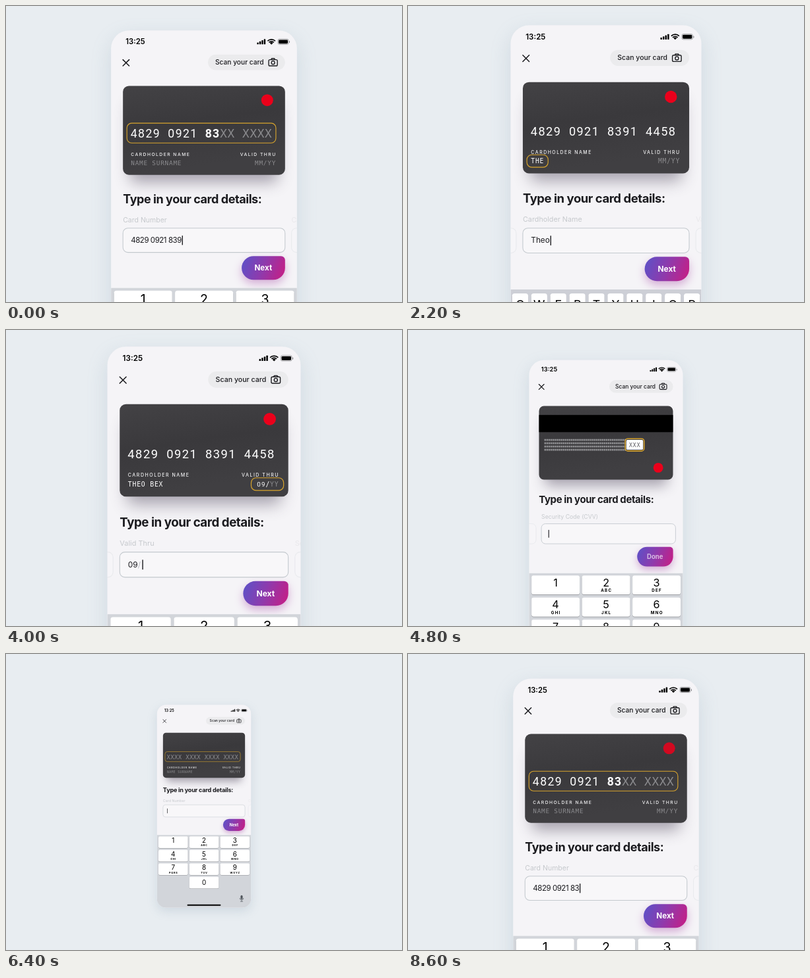
Write an HTML page with a canvas that moves like this. It is 600x450 px and loops after 8.7 s.

```html
<!DOCTYPE html>
<html lang="en">
<head>
<meta charset="utf-8">
<title>Card details form</title>
<style>
  html, body { margin: 0; width: 100%; height: 100%; overflow: hidden; background: #e8edf1; }
  canvas { display: block; width: 600px; height: 450px; }
</style>
</head>
<body>
<canvas id="stage"></canvas>
<script>
const LOOP = 8700, LEAD = 2300;        // the page opens LEAD ms into the cycle that begins with an empty form
const W = 375, H = 812;                // phone size in its own units
const SANS = 'Inter, sans-serif', MONO = '"DejaVu Sans Mono", monospace', DIGIT = 'Roboto, sans-serif';
const GOLD = '#d9a52c', INK = '#1b1b1f', RED = '#eb001b', FAINT = '#8b8b8e';

const fields = [
  { label: 'Card Number', chars: '4829092183914458', start: 250, gap: 200 },
  { label: 'Cardholder Name', chars: 'Theo Bex', start: 3980, gap: 150 },
  { label: 'Valid Thru', chars: '0921', start: 5800, gap: 260 },
  { label: 'Security Code (CVV)', chars: '927', start: 7450, gap: 250 }
];

const canvas = document.getElementById('stage'), ctx = canvas.getContext('2d');
const dpr = Math.max(1, window.devicePixelRatio || 1);
canvas.width = 600 * dpr;
canvas.height = 450 * dpr;
let zoom = 1;

const clamp = v => Math.min(1, Math.max(0, v));
const mix = (a, b, p) => a + (b - a) * p;
const cubic = p => p < .5 ? 4 * p ** 3 : 1 - 4 * (1 - p) ** 3;
const sine = p => (1 - Math.cos(Math.PI * p)) / 2;
const ramp = (u, start, length, ease = cubic) => ease(clamp((u - start) / length));

function typed(field, u, lag = 0) {
  if (u > 8420) return 0;
  const n = Math.floor((u - lag - field.start) / field.gap) + 1;
  return Math.min(field.chars.length, Math.max(0, n));
}

function box(x, y, w, h, r, fill, stroke, line = 1.4) {
  ctx.beginPath();
  ctx.roundRect(x, y, w, h, r);
  if (fill) { ctx.fillStyle = fill; ctx.fill(); }
  if (stroke) { ctx.strokeStyle = stroke; ctx.lineWidth = line; ctx.stroke(); }
}

function circle(x, y, r, fill) {
  ctx.beginPath();
  ctx.arc(x, y, r, 0, 2 * Math.PI);
  if (fill) { ctx.fillStyle = fill; ctx.fill(); } else ctx.stroke();
}

function line(...points) {
  ctx.beginPath();
  for (let i = 0; i < points.length; i += 2) ctx.lineTo(points[i], points[i + 1]);
  ctx.stroke();
}

function text(str, x, y, font, color, align = 'left', spacing = 0) {
  ctx.font = font;
  ctx.fillStyle = color;
  ctx.textAlign = align;
  ctx.letterSpacing = spacing + 'px';
  ctx.fillText(str, x, y);
  return ctx.measureText(str).width;
}

function withShadow(color, blur, dy, draw) {
  ctx.save();
  ctx.shadowColor = color;
  ctx.shadowBlur = blur * zoom * dpr;
  ctx.shadowOffsetY = dy * zoom * dpr;
  draw();
  ctx.restore();
}

function gradient(x0, y0, x1, y1, ...colors) {
  const g = ctx.createLinearGradient(x0, y0, x1, y1);
  colors.forEach((c, i) => g.addColorStop(i / (colors.length - 1), c));
  return g;
}

// Embossed card lettering: each character sits in a cell of equal width.
function embossed(str, x, y, size, cell, style) {
  [...str].forEach((ch, i) => {
    const [color, weight = 400] = style(i);
    text(ch, x + cell * (i + .5), y, `${weight} ${size}px ${/\d/.test(ch) ? DIGIT : MONO}`, color, 'center');
  });
}

function header() {
  text('13:25', 29.5, 28, `600 15px ${SANS}`, '#000');
  for (let i = 0; i < 4; i++) box(294.5 + i * 4.6, 24.2 - i * 2.3, 3.2, 3.8 + i * 2.3, .8, '#000');

  ctx.strokeStyle = '#000';
  ctx.lineWidth = 2.2;
  for (const r of [11, 7]) {
    ctx.beginPath();
    ctx.arc(323.5, 29, r, -Math.PI * .75, -Math.PI * .25);
    ctx.stroke();
  }
  ctx.beginPath();
  ctx.moveTo(323.5, 28.5);
  ctx.arc(323.5, 28.5, 4.6, -Math.PI * .75, -Math.PI * .25);
  ctx.fillStyle = '#000';
  ctx.fill();
  box(336.5, 17.3, 21.5, 10.7, 3, null, '#8a8a8d', 1);
  box(338, 18.8, 18.5, 7.7, 1.8, '#000');
  box(359.2, 21, 1.4, 4, .7, '#8a8a8d');

  ctx.strokeStyle = INK;
  ctx.lineWidth = 2;
  ctx.lineCap = 'round';
  line(24, 59, 36.5, 71.5);
  line(36.5, 59, 24, 71.5);
  ctx.lineCap = 'butt';

  box(195.5, 48.5, 155.5, 31.5, 16, '#ebebed');
  text('Scan your card', 210, 69, `500 13.6px ${SANS}`, INK);
  ctx.strokeStyle = INK;
  ctx.lineWidth = 1.8;
  ctx.lineJoin = 'round';
  ctx.beginPath();
  ctx.roundRect(318, 59, 17.5, 12.5, 2.5);
  ctx.stroke();
  line(322.5, 59, 324, 56.5, 329.5, 56.5, 331, 59);
  circle(326.8, 65, 3.3);
}

function highlight(u, step) {
  const nameLength = typed(fields[1], u, 100) || 12;
  const spots = [
    [32, 187.5, 300.5, 40], [32, 255.5, 16 + 8.55 * nameLength, 24.5],
    [279, 255.5, 63, 24.5], [279, 255.5, 63, 24.5]
  ];
  const i = Math.min(2, Math.floor(step));
  const [x, y, w, h] = spots[i].map((v, k) => mix(v, spots[i + 1][k], step - i));
  box(x, y, w, h, 9.5, null, GOLD, 1.5);
}

function cardFront(u, step) {
  const [number, name, date] = fields;
  const shown = typed(number, u, 100), nameShown = typed(name, u, 100), dateShown = typed(date, u, 100);

  // The issuer badge fades in once enough digits are known.
  ctx.globalAlpha = u > 8420 ? 0 : ramp(u, 1900, 450);
  circle(315, 141, 12, RED);
  ctx.globalAlpha = 1;

  const digits = number.chars.slice(0, shown).padEnd(16, 'X').replace(/(.{4})(?=.)/g, '$1 ');
  embossed(digits, 38.5, 217, 23.5, 15.06, cellIndex => {
    const i = cellIndex - Math.floor(cellIndex / 5);
    if (i >= shown) return [FAINT];
    const fresh = shown < 16 && u - number.start - i * number.gap < 460;
    return ['#fff', fresh ? 700 : 400];
  });

  const caption = `500 9px ${SANS}`;
  text('CARDHOLDER NAME', 40, 253.5, caption, '#f2f2f3', 'left', 1.95);
  text('VALID THRU', 333.5, 253.5, caption, '#f2f2f3', 'right', 1.95);
  const nameText = nameShown ? name.chars.slice(0, nameShown).toUpperCase() : 'NAME SURNAME';
  embossed(nameText, 39.5, 272.5, 12.5, 8.55, () => [nameShown ? '#fff' : FAINT]);
  const dateText = [...'MMYY'].map((ch, i) => i < dateShown ? date.chars[i] : ch).join('');
  embossed(dateText.slice(0, 2) + '/' + dateText.slice(2), 289.5, 272.5, 12.5, 8.55,
    i => [(i > 2 ? i - 1 : i) < dateShown || (i === 2 && dateShown > 1) ? '#fff' : FAINT]);
  highlight(u, step);
}

function cardBack(u) {
  const cvv = fields[3];
  ctx.fillStyle = '#000';
  ctx.fillRect(24, 134, 327, 42);
  ctx.strokeStyle = '#8f8f92';
  ctx.lineWidth = 4.5;
  ctx.setLineDash([4, 1]);
  for (let y = 195; y < 224; y += 8) line(37, y, 236, y);
  ctx.setLineDash([]);
  box(237, 195, 41, 24, 3, '#fff');
  box(234.5, 192, 46, 30, 6, null, GOLD, 2.5);
  embossed(cvv.chars.slice(0, typed(cvv, u, 100)).padEnd(3, 'X'), 243, 212, 13, 9.5, () => ['#55555a']);
  circle(315, 263, 12, RED);
}

function card(u, step, flip) {
  ctx.save();
  ctx.translate(187.5, 0);
  ctx.scale(Math.max(.01, Math.abs(Math.cos(Math.PI * flip))), 1);
  ctx.translate(-187.5, 0);
  withShadow('rgba(60,50,74,.42)', 30, 17, () => box(38, 130, 299, 160, 12, '#3c3c3f'));
  box(24, 112, 327, 180, 12, gradient(24, 112, 50, 292, '#434245', '#3a393c', '#403f42'));
  if (flip < .5) cardFront(u, step); else cardBack(u);
  ctx.restore();
}

function fieldText(i, u) {
  const { chars } = fields[i], entered = chars.slice(0, typed(fields[i], u));
  if (i === 0) return entered.replace(/(.{4})(?=.)/g, '$1 ');
  if (i === 2 && entered.length > 1) return entered.slice(0, 2) + '/' + entered.slice(2);
  return entered;
}

function inputs(u, step) {
  text('Type in your card details:', 24, 350, `700 24px ${SANS}`, INK, 'left', -.6);
  fields.forEach((field, i) => {
    const distance = Math.abs(i - step), x = 24 + 340 * (i - step);
    ctx.globalAlpha = 1 - .75 * clamp(distance);
    text(field.label, x, 388, `400 14px ${SANS}`, '#c6c9cd');
    box(x, 400, 327, 49, 10, '#f8f7f9', '#c3c9ce');
    const font = `400 15.3px ${SANS}`, spacing = i === 0 ? -.6 : 0;
    let end = x + 16;
    for (const part of fieldText(i, u).split(/(\/$)/)) {
      const slash = part === '/';
      end += text(part, end, 429.5, font, slash ? '#b4b7bc' : INK, 'left', slash ? 2 : spacing);
    }
    if (distance < .5) {
      ctx.fillStyle = INK;
      ctx.fillRect(end + 1, 415, 1.8, 19);
    }
    ctx.globalAlpha = 1;
  });
}

function button(u, step) {
  const last = step > 2.5;
  withShadow('rgba(150,40,150,.35)', 18, 8, () =>
    box(263.5, 456.5, 87.5, 48, [24, 8, 24, 24], gradient(266, 462, 350, 494, '#5f50c6', '#8f3aac', '#c41f86')));
  const color = last && typed(fields[3], u) < 3 ? 'rgba(255,255,255,.65)' : '#fff';
  text(last ? 'Done' : 'Next', 307, 486, `700 15.5px ${SANS}`, color, 'center');
}

function key(x, y, w, h, fill) {
  box(x, y + 1.2, w, h, 5, '#8b8d92');
  box(x, y, w, h, 5, fill);
}

function pressedDigit(u) {
  for (const field of [fields[0], fields[2], fields[3]]) {
    const n = typed(field, u), age = u - field.start - (n - 1) * field.gap;
    if (n && age < 140) return field.chars[n - 1];
  }
}

function numberPad(u) {
  const letters = ['', 'ABC', 'DEF', 'GHI', 'JKL', 'MNO', 'PQRS', 'TUV', 'WXYZ'];
  const down = pressedDigit(u);
  for (const digit of '1234567890') {
    const i = digit === '0' ? 10 : digit - 1;
    const x = 6 + 123 * (i % 3), y = 526.5 + 54 * Math.floor(i / 3);
    key(x, y, 117.3, 46.5, digit === down ? '#b6bec8' : '#fff');
    text(digit, x + 58.6, y + (i === 10 ? 33 : 26.5), `400 26px ${SANS}`, '#000', 'center');
    if (letters[i]) text(letters[i], x + 59.6, y + 40, `700 10px ${SANS}`, '#000', 'center', 2);
  }
  box(333.5, 762, 8, 16, 4, '#50555c');
  ctx.strokeStyle = '#50555c';
  ctx.lineWidth = 1.8;
  ctx.beginPath();
  ctx.arc(337.5, 773, 7.5, 0, Math.PI);
  ctx.stroke();
  line(337.5, 780, 337.5, 787);
  line(332, 787, 343, 787);
  box(120.5, 799, 134, 5, 2.5, '#000');
}

function keyboard(u, step) {
  const alpha = step > .5 && step < 1.5;
  ctx.fillStyle = alpha ? '#cdcfd6' : '#d2d5da';
  ctx.fillRect(0, 521, W, H - 521);
  if (!alpha) return numberPad(u);
  [...'QWERTYUIOP'].forEach((letter, i) => {
    key(3 + 37.5 * i, 529, 31.5, 42, '#fff');
    text(letter, 18.75 + 37.5 * i, 558.5, `400 23px ${SANS}`, '#000', 'center');
  });
}

function render(now) {
  const u = (now + LEAD) % LOOP;
  const back = ramp(u, 8250, 400), turn = ramp(u, 6750, 420), pullOut = ramp(u, 6800, 650);
  const step = ramp(u, 3680, 400) + ramp(u, 5350, 400) + turn - 3 * back;
  const push = ramp(u, 1600, 4700, sine);
  zoom = mix(.38 + .3695 * ramp(u, 133, 1100) + .0315 * push, .38, pullOut);
  const centerY = mix(mix(231.5, 342.3, ramp(u, 250, 760)), 231.5, pullOut);

  ctx.setTransform(dpr, 0, 0, dpr, 0, 0);
  ctx.fillStyle = '#e8edf1';
  ctx.fillRect(0, 0, 600, 450);
  ctx.translate(300, centerY);
  ctx.scale(zoom, zoom);
  ctx.translate(-W / 2, -H / 2);
  ctx.save();
  withShadow('rgba(120,145,170,.22)', 40, 14, () => box(0, 0, W, H, 36, '#f5f4f7'));
  ctx.clip();
  header();
  card(u, step, turn - back);
  inputs(u, step);
  button(u, step);
  keyboard(u, step);
  ctx.restore();
}

function tick() {
  render(performance.now());
  requestAnimationFrame(tick);
}
tick();
</script>
</body>
</html>
```
